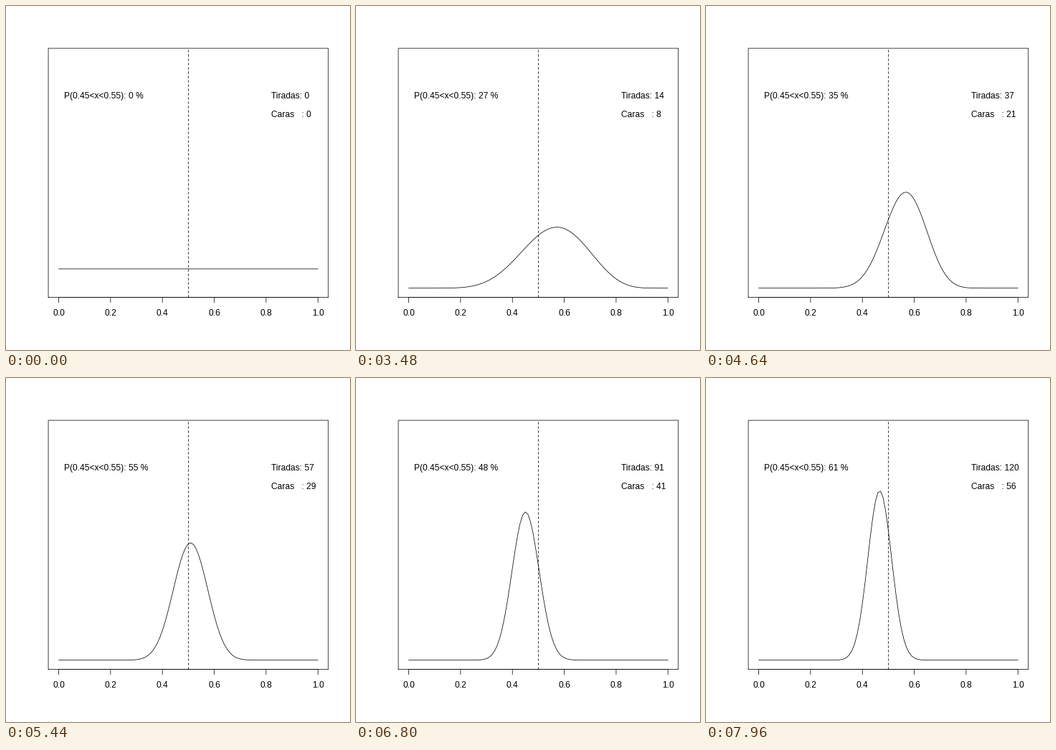
Animation, 480 px wide and 480 px high, one loop 8000 ms. Source, as a matplotlib script:

```python
import math

import numpy as np
import matplotlib.pyplot as plt
from matplotlib.animation import FuncAnimation

SIZE, DPI, TICK_MS = 480, 100, 40
PX = 72 / DPI                      # one pixel in points

# Plot box, with 4 % padding around x in 0..1 and density in 0..12
LEFT, RIGHT, TOP, BOTTOM = 59.04, 449.76, 59.04, 406.56
SPAN = (RIGHT - LEFT) / 1.08
UNIT = (BOTTOM - TOP) / 1.08 / 12
X0 = LEFT + 0.04 * SPAN
BASE = BOTTOM - 0.04 * 12 * UNIT

plt.rcParams.update({
    "font.family": "Liberation Sans",
    "font.size": 12 * PX,
})

# Tosses speed up: ticks each count stays on screen
HOLD = [25, 10, 10, 9, 8, 6, 4, 3] + [2] * 12 + [1] * 101
TOSSES = np.repeat(np.arange(len(HOLD)), HOLD)

# Running number of heads, between a few known counts
KNOTS = [(0, 0), (2, 2), (3, 2), (6, 5), (8, 5), (9, 6), (14, 8), (15, 9),
         (17, 10), (37, 21), (76, 36), (80, 36), (106, 47), (120, 56)]
HEADS = np.floor(np.interp(range(len(HOLD)), *zip(*KNOTS)) + 0.5).astype(int)

GRID = np.linspace(0, 1, 101)
FINE = np.linspace(0.45, 0.55, 401)


def density(x, n, k):
    """Posterior of the heads rate under a flat prior."""
    return (n + 1) * math.comb(n, k) * x**k * (1 - x)**(n - k)


def chance(n, k):
    if n == 0:
        return 0
    return round(100 * np.trapezoid(density(FINE, n, k), FINE))


fig = plt.figure(figsize=(SIZE / DPI, SIZE / DPI), dpi=DPI, facecolor="white")
ax = fig.add_axes([0, 0, 1, 1])
ax.set(xlim=(0, SIZE), ylim=(SIZE, 0))
ax.axis("off")


def line(xs, ys, **style):
    return ax.plot(xs, ys, color="black", lw=0.75 * PX, snap=False,
                   solid_capstyle="round", solid_joinstyle="round",
                   dash_capstyle="round", **style)[0]


def label(x, y, text="", ha="left"):
    return ax.text(x, y, text, ha=ha, va="baseline", color="black")


line([LEFT, RIGHT, RIGHT, LEFT, LEFT], [BOTTOM, BOTTOM, TOP, TOP, BOTTOM])
line([X0 + SPAN / 2] * 2, [BOTTOM, TOP], ls=(0, (4, 4)))
line([X0, X0 + SPAN], [BOTTOM, BOTTOM])
for i in range(6):
    x = X0 + SPAN * i / 5
    line([x, x], [BOTTOM, BOTTOM + 7.2])
    label(x, 432, f"{i / 5:.1f}", ha="center")

curve = line(X0 + SPAN * GRID, np.full_like(GRID, BASE))
prob = label(81, 129)
tosses = label(370, 129)
heads = label(370, 155)


def draw(frame):
    n = int(TOSSES[frame])
    k = int(HEADS[n])
    curve.set_ydata(BASE - UNIT * density(GRID, n, k))
    prob.set_text(f"P(0.45<x<0.55): {chance(n, k)} %")
    tosses.set_text(f"Tiradas: {n}")
    heads.set_text(f"Caras   : {k}")
    return curve, prob, tosses, heads


anim = FuncAnimation(fig, draw, frames=len(TOSSES), interval=TICK_MS,
                     repeat=True, repeat_delay=0)
plt.show()
```
